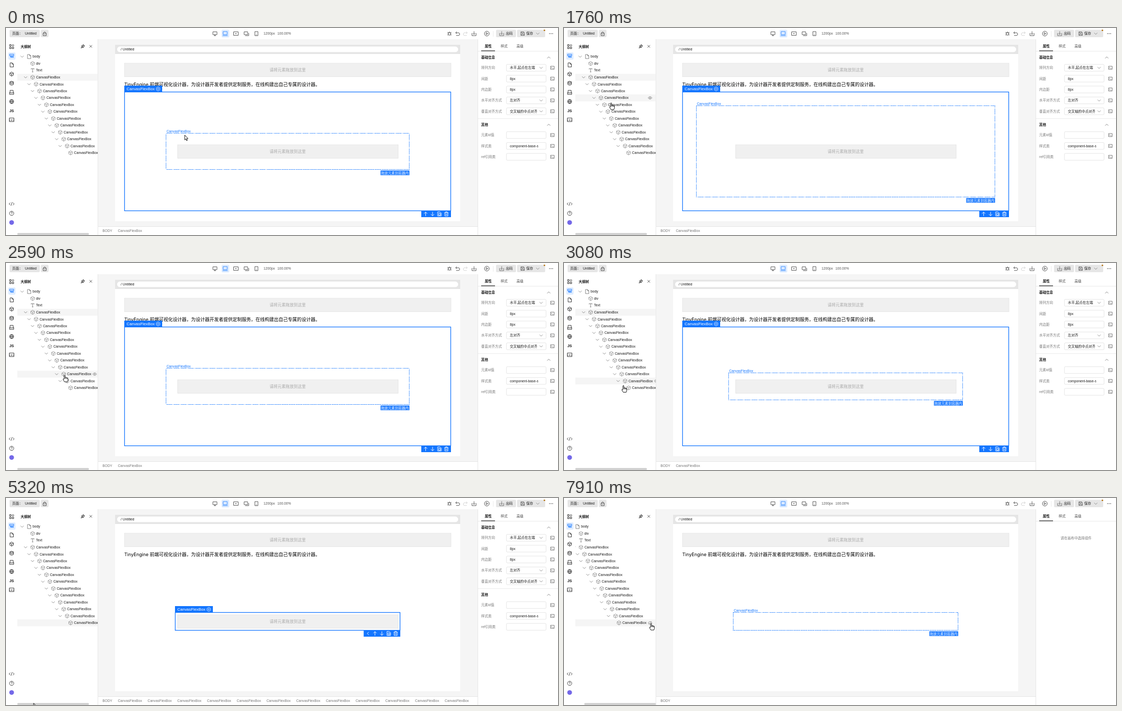
These frames come from a looping animation (1078x406 px, 8000 ms). An HTML page:

```html
<!DOCTYPE html>
<html lang="zh">
<head>
<meta charset="utf-8">
<title>Page designer</title>
<style>
html, body { margin: 0; width: 100%; height: 100%; overflow: hidden; background: #fff; }
svg { display: block; width: 1078px; height: 406px; font-family: 'Liberation Sans', 'Noto Sans CJK SC', 'Noto Sans CJK', sans-serif; }
svg svg { width: auto; height: auto; }
text { white-space: pre; }
</style>
</head>
<body>
<svg id="stage" viewBox="0 0 1078 406"></svg>
<script>
const LOOP = 8000, ROW = 13.48, STEP = 6.74, LAST = 11;
const BLUE = '#1476ff', INK = '#191919', GRAY = '#777';
const SMALL = 6.74, MEDIUM = 7.86, LARGE = 8.99;

// Pointer: [start, end, steps, ...waypoints]; it rests between moves.
const moves = [
  [130, 870, 9, [265, 175], [150, 125], [70, 90], [66, 86], [75, 92]],
  [1140, 1900, 12, [78, 103], [82, 117], [86, 129], [90, 140], [92, 146.5], [93, 147.5]],
  [1970, 2730, 12, [100, 170], [107, 196], [112, 212], [114, 218], [114.5, 219.5], [106, 228]],
  [2800, 3410, 8, [112, 236], [120, 244], [124.5, 244]],
  [3810, 4560, 12, [126, 246], [122, 262], [116, 290], [105, 320], [92, 352], [80, 382], [74, 401]],
  [4630, 4770, 3, [69, 401]],
  [4970, 4970, 1, [69.5, 402]],
  [5170, 5170, 1, [69, 401]],
  [5320, 5320, 1, [54, 402]],
  [5720, 6210, 8, [128, 404]],
  [6540, 7300, 11, [135, 404], [146, 392], [158, 372], [168, 350], [175, 326], [180, 302],
    [182, 285], [180, 270], [176, 260], [169, 252], [162, 244]],
  [7370, 7440, 2, [170, 245.5]]
];
const SELECT_AT = 3410, HIDE_AT = 7770, DESELECT_AT = 7840;

const icons = {
  cube: 'M0-4 3.5-2V2L0 4-3.5 2V-2ZM-3.5-2 0 0 3.5-2M0 0V4',
  down: 'M-3-1.5 0 1.5 3-1.5',
  up: 'M-3 1.5 0-1.5 3 1.5',
  left: 'M1.5-3-1.5 0 1.5 3',
  page: 'M-3-4H1L3.5-1.5V4H-3ZM1-4V-1.5H3.5',
  letter: 'M-3-2V-3.2H3V-2M0-3.2V3.2M-1.3 3.2H1.3',
  eye: 'M-4 0Q0-5 4 0Q0 5-4 0ZM-1.3 0A1.3 1.3 0 1 0 1.3 0A1.3 1.3 0 1 0-1.3 0',
  hidden: 'M-4 0Q0-5 4 0Q0 5-4 0ZM-3 3 3-3',
  close: 'M-2.5-2.5 2.5 2.5M2.5-2.5-2.5 2.5',
  pin: 'M-3.5 3.5-1 1M-2.5-1 1 2.5M-2-.5 1-3 3-1 .5 2Z',
  lock: 'M-3-1H3V4H-3ZM-2-1V-2Q0-5 2-2V-1M0 1V2.3',
  screen: 'M-4-3.5H4V2H-4ZM0 2V4M-2 4H2',
  laptop: 'M-4-4H4V2H-4ZM-5 4H5',
  tablet: 'M-4.5-3.5H4.5V3.5H-4.5ZM0-1V1M-1 0H1',
  windows: 'M-4-3.5H3V2H-4ZM-2 4H5V-1',
  phone: 'M-3-4H3V4H-3ZM-.7 2.7H.7',
  gear: 'M0-4 3.5-2V2L0 4-3.5 2V-2ZM-1.4 0A1.4 1.4 0 1 0 1.4 0A1.4 1.4 0 1 0-1.4 0',
  bug: 'M-2-2H2V2Q0 5-2 2ZM-4-3-2-1M4-3 2-1M-4 1H-2M4 1H2M-3.5 4-2 2.5M3.5 4 2 2.5M-1.5-2Q0-5 1.5-2',
  undo: 'M-1.5-4-4-1.7-1.5.5M-4-1.7H1Q4-1.7 4 1T1 3.7H-3',
  redo: 'M1.5-4 4-1.7 1.5.5M4-1.7H-1Q-4-1.7-4 1T-1 3.7H3',
  download: 'M-4-1V4H4V-1M0-4.5V1.5M-2-.5 0 1.5 2-.5',
  play: 'M-4.7 0A4.7 4.7 0 1 0 4.7 0A4.7 4.7 0 1 0-4.7 0M-1.3-2.2V2.2L2.3 0Z',
  save: 'M-3.5-3.5H2L3.5-2V3.5H-3.5ZM-2-3.5V-1H1.5V-3.5M-2 3.5V1H2V3.5',
  grid: 'M-4-4H-1V-1H-4ZM-4 1H-1V4H-4ZM1 1H4V4H1ZM2.5-4A1.5 1.5 0 1 0 2.6-4',
  outline: 'M-4-3H4V0H-4ZM-2 0V3H4M-2 1.5H4',
  data: 'M-3.5-2.5Q0-5.5 3.5-2.5V2.5Q0 5.5-3.5 2.5ZM-3.5-2.5Q0 0 3.5-2.5M-3.5 0Q0 2.5 3.5 0',
  drawer: 'M-3-4H3V0H4V4H-4V0H-3ZM-4 1H4',
  globe: 'M-4 0A4 4 0 1 0 4 0A4 4 0 1 0-4 0H4M0-4Q-3.5 0 0 4Q3.5 0 0-4',
  card: 'M-4.5-3.5H4.5V3.5H-4.5ZM-3 0V1.5M-1-.5 0 1.5 1-.5M3 0V1.5',
  code: 'M-2.5-2.5-5 0-2.5 2.5M2.5-2.5 5 0 2.5 2.5M1-3.5-1 3.5',
  help: 'M-4.2 0A4.2 4.2 0 1 0 4.2 0A4.2 4.2 0 1 0-4.2 0M-1.3-1Q-1-2.5 0-2.5Q1.5-2.3 1.3-1Q1 0 0 .5V1M0 2.2V2.8',
  bind: 'M-3.5-3H3.5V3H-3.5ZM-2-1.2-.7 0-2 1.2M.5 1.3H2',
  arrowUp: 'M0 4V-3.5M-3.2-.5 0-3.7 3.2-.5',
  arrowDown: 'M0-4V3.5M-3.2.5 0 3.7 3.2.5',
  copy: 'M-3.5-4H1L3.5-1.5V4H-3.5ZM-1.5-1H2V2.5H-1.5Z',
  trash: 'M-4-2.5H4M-1.5-2.5V-4H1.5V-2.5M-3-2.5V4H3V-2.5M-1-.5V2.3M1-.5V2.3'
};

const rect = (x, y, w, h, fill, extra = '') =>
  `<rect x="${x}" y="${y}" width="${w}" height="${h}" fill="${fill}" ${extra}/>`;
const text = (x, y, content, fill = INK, size = SMALL, extra = '') =>
  `<text x="${x}" y="${y + size * .36}" font-size="${size}" fill="${fill}" ${extra}>${content}</text>`;
const icon = (name, x, y, color = '#333', width = .8) =>
  `<path transform="translate(${x} ${y})" d="${icons[name]}" fill="none" stroke="${color}" stroke-width="${width}"/>`;
const circle = (x, y, r, fill) => `<circle cx="${x}" cy="${y}" r="${r}" fill="${fill}"/>`;
const clip = (x, y, w, h, content) =>
  `<svg x="${x}" y="${y}" width="${w}" height="${h}" viewBox="${x} ${y} ${w} ${h}" style="width:${w}px;height:${h}px">${content}</svg>`;
const MIDDLE = 'text-anchor="middle" ', BOLD = 'font-weight="bold"', CRISP = 'shape-rendering="crispEdges" ';

function header() {
  const button = (x, w) => rect(x, 3.5, w, 14.5, '#e6e6e6', 'rx="2"');
  const tools = [['bug', 866], ['undo', 882], ['redo', 897, '#ccc'], ['download', 914], ['play', 939]];
  const devices = [['screen', 408], ['laptop', 428, BLUE], ['tablet', 449], ['windows', 469], ['phone', 489]];
  return button(7, 59) + button(68, 15) + button(957, 39) + button(998, 55) +
    text(12, 11, '页面：') + text(37, 11, 'Untitled') + icon('lock', 75.5, 11) +
    rect(421, 3.5, 15, 15, '#deecff', 'rx="2"') +
    [...devices, ...tools].map(([name, x, color]) => icon(name, x, 11, color)).join('') +
    text(503, 11, '1200px', '#555') + text(530, 11, '100.00%', '#555') +
    rect(951, 6, .6, 11, '#ddd') +
    icon('download', 968, 11, '#555') + text(976, 11, '出码') +
    icon('save', 1009, 11, '#555') + text(1016, 11, '保存') + icon('down', 1038.5, 11, '#666', .7) +
    circle(1051.5, 4.5, 1.6, '#b87a1c') + [1061.5, 1064.5, 1067.5].map(x => circle(x, 11, .8, '#333')).join('');
}

function sidebar() {
  const names = ['grid', 'outline', 'page', 'cube', 'data', 'drawer', 'globe', '', 'card'];
  return rect(4.5, 48, 14, 14, '#deecff', 'rx="2"') +
    names.map((name, i) => name && icon(name, 11, 36.5 + i * 17.95, i === 1 ? BLUE : '#222', .9)).join('') +
    text(11, 162, 'JS', INK, 7.5, MIDDLE + BOLD) +
    icon('code', 11, 345, '#222') + icon('help', 11, 363.5, '#222') + circle(11, 381.5, 4.6, '#7468e8') +
    text(28.5, 36.5, '大纲树', INK, SMALL, BOLD) + icon('pin', 150, 36, '#222', 1.1) + icon('close', 165.5, 36);
}

const placeholder = (x, y, w) =>
  rect(x, y, w, 26.5, '#f0f0f0', 'stroke="#dcdcdc" stroke-width=".6"') +
  text(550, y + 13.5, '请将元素拖放到这里', '#aaa', MEDIUM, MIDDLE);

function page() {
  return rect(180, 22, 741, 367.5, '#f5f5f5') + rect(213, 33, 674, 346, '#fff') +
    rect(213, 33, 674, 18, '#e5e5e5') + rect(217, 36.3, 666, 11, '#fff', 'rx="5.5"') +
    text(224, 41.7, '/ Untitled') + placeholder(231.5, 69, 637.5) +
    text(231, 111, 'TinyEngine 前端可视化设计器，为设计器开发者提供定制服务，在线构建出自己专属的设计器。',
      '#000', LARGE, `style="font-family:Inter,'Noto Sans CJK SC','Noto Sans CJK',sans-serif"`) +
    rect(180, 389, 741, .7, '#ddd') + rect(179.3, 22, .7, 384, '#ddd') + rect(921, 22, .7, 384, '#ddd');
}

const tabs = text(935, 36, '属性', INK, SMALL, BOLD) + text(966, 36, '样式', '#444') + text(997, 36, '高级', '#444') +
  rect(921, 45.2, 157, .6, '#ddd') + rect(928, 44.2, 27, 1.2, INK);

function properties() {
  const field = (y, label, value, select) =>
    text(928, y, label, GRAY) +
    rect(977.3, y - 6.7, 77.4, 13.4, '#fff', 'rx="2" stroke="#d4d4d4" stroke-width=".6"') +
    clip(984, y - 6, select ? 53 : 55.5, 12, text(984, y, value)) +
    (select ? icon('down', 1045, y, '#666', .7) : '') + icon('bind', 1067, y, '#444', .7);
  const title = (y, label) => text(928, y, label, INK, SMALL, BOLD) + icon('up', 1060, y, '#555', .7);
  return title(58, '基础信息') +
    field(78, '排列方向', '水平,起点在左端', true) + field(99.3, '间距', '8px') + field(120.6, '内边距', '8px') +
    field(142, '水平对齐方式', '左对齐', true) + field(163.3, '垂直对齐方式', '交叉轴的中点对齐', true) +
    rect(921, 177.5, 157, .6, '#ddd') + title(190, '其他') +
    field(210, '元素id值', '') + field(231.3, '样式类', 'component-base-style') + field(252.7, 'ref引用类', '');
}

const box = depth => {
  const inset = depth * 9;
  return { x: 231.5 + inset, y: 125.5 + inset, r: 868.5 - inset, b: 358.5 - inset };
};
const frame = ({ x, y, r, b }, extra) => rect(x, y, r - x, b - y, 'none', `stroke="${BLUE}" ${extra}`);

function selection(depth) {
  const area = box(depth), names = ['arrowUp', 'arrowDown', 'copy', 'trash'];
  if (depth) names.unshift('left');
  const width = names.length * 13.5 + 4;
  return frame(area, 'stroke-width="1.3"') +
    rect(area.x - .5, area.y - 12.5, 74, 12.5, BLUE) +
    text(area.x + 4, area.y - 6, 'CanvasFlexBox', '#fff', MEDIUM) + icon('gear', area.x + 65.5, area.y - 6, '#fff', .7) +
    rect(area.r + .5 - width, area.b, width, 12.5, BLUE) +
    names.map((name, i) => icon(name, area.r - 8.5 - 13.5 * (names.length - 1 - i), area.b + 6.2, '#fff', .9)).join('');
}

function hoverBox(depth) {
  const area = box(depth);
  return frame(area, CRISP + 'stroke-width="1" stroke-dasharray="1.7 1.1"') +
    text(area.x + 1, area.y - 3.7, 'CanvasFlexBox', BLUE) +
    rect(area.r - 56, area.b + 2, 56.3, 9.2, BLUE) +
    text(area.r - 55, area.b + 6.6, '拖放元素到容器内', '#fff');
}

function tree(scroll, selected, hovered, hidden) {
  const rowY = depth => 96.6 + depth * ROW;
  const shade = depth => depth < 0 ? '' : rect(22, rowY(depth) - 6.7, 157.3, ROW, '#f5f5f5');
  let rows = icon('down', 31.5, 56, '#777') + icon('page', 45, 56, '#555', .7) + text(52, 56, 'body') +
    icon('cube', 52, 69.6, GRAY, .7) + text(58.5, 69.6, 'div') + icon('letter', 52, 83, '#555', .7) + text(58.5, 83, 'Text');
  for (let depth = 0; depth <= LAST; depth++) {
    const x = depth * STEP, y = rowY(depth);
    rows += (depth < LAST ? icon('down', 38.3 + x, y, '#777') : '') +
      icon('cube', 52 + x, y, GRAY, .7) + text(58.7 + x, y, 'CanvasFlexBox');
  }
  const eyeX = Math.max(168, 112.5 + hovered * STEP - scroll * 18.8);
  const eye = hovered < 0 ? '' : icon(hidden ? 'hidden' : 'eye', eyeX, rowY(hovered), '#777', .7);
  return shade(selected) + shade(hovered) +
    clip(22, 48, 157.3, 210, `<g transform="translate(${-scroll * 18.8} 0)">${rows}</g>${eye}`) +
    rect(22 + scroll * 17.5, 402, 140, 4, '#d2d2d2', 'rx="2"');
}

function pointer(t) {
  let at = [349, 209.5];
  for (const [start, end, steps, ...stops] of moves) {
    if (t < start) break;
    const interval = (end - start) / Math.max(1, steps - 1) || 1;
    const done = Math.min(steps, Math.floor((t - start) / interval + .02) + 1);
    const path = [at, ...stops], u = done / steps * stops.length;
    const i = Math.min(Math.floor(u), stops.length - 1);
    at = path[i].map((v, axis) => v + (path[i + 1][axis] - v) * (u - i));
  }
  return at;
}

const cursor = (x, y, hand) => `<path transform="translate(${x} ${y})" fill="#fff" stroke="#000" stroke-width=".9" stroke-linejoin="round" d="${
  hand ? 'M-1 1Q0-.6 1 1V5Q2 4 3 5.2Q4 4.5 5 5.8Q6.5 5.3 6.6 7V10L5.5 13.5H-.3L-3 9Q-3.5 7.2-1 8.3ZM1 5V7.5M3 5.2V7.7M5 5.8V8'
       : 'M0 .5V10L2.2 8 3.6 11.4 5.2 10.7 3.7 7.4H6.5Z'}"/>`;

const chrome = header() + sidebar() + page() + tabs;
const panel = properties();
const emptyPanel = text(1000, 78.3, '请在画布中选择组件', GRAY, SMALL, MIDDLE);

function scene(t) {
  const [x, y] = pointer(t);
  const inTree = x > 22 && x < 180 && y > 48 && y < 255;
  const selected = t < SELECT_AT ? 0 : t < DESELECT_AT ? LAST : -1;
  const row = Math.floor((y - 94.5) / ROW);
  const hovered = inTree && row >= 0 ? Math.min(row, LAST) : -1;
  const over = x > 231 ? Math.floor(Math.min(x - 231, y - 125) / 9) : hovered;
  const scroll = t < 5720 ? 0 : Math.min(1, (x - 54) / 17);
  const crumbs = selected < 0 ? 0 : selected + 1;
  return chrome + (t < HIDE_AT ? placeholder(335, 229, 431) : '') +
    (over >= 0 && over !== selected ? hoverBox(over) : '') +
    (selected < 0 ? emptyPanel : selection(selected) + panel) +
    text(188.5, 397.5, 'BODY', GRAY) +
    Array.from({ length: crumbs }, (_, i) => text(218.5 + i * 58.03, 397.5, 'CanvasFlexBox', GRAY)).join('') +
    tree(scroll, selected, hovered, t >= HIDE_AT) + cursor(x, y, inTree);
}

const stage = document.getElementById('stage');
let shown = '';
function draw() {
  const next = scene(performance.now() % LOOP);
  if (next !== shown) stage.innerHTML = shown = next;
  requestAnimationFrame(draw);
}
draw();
</script>
</body>
</html>
```
